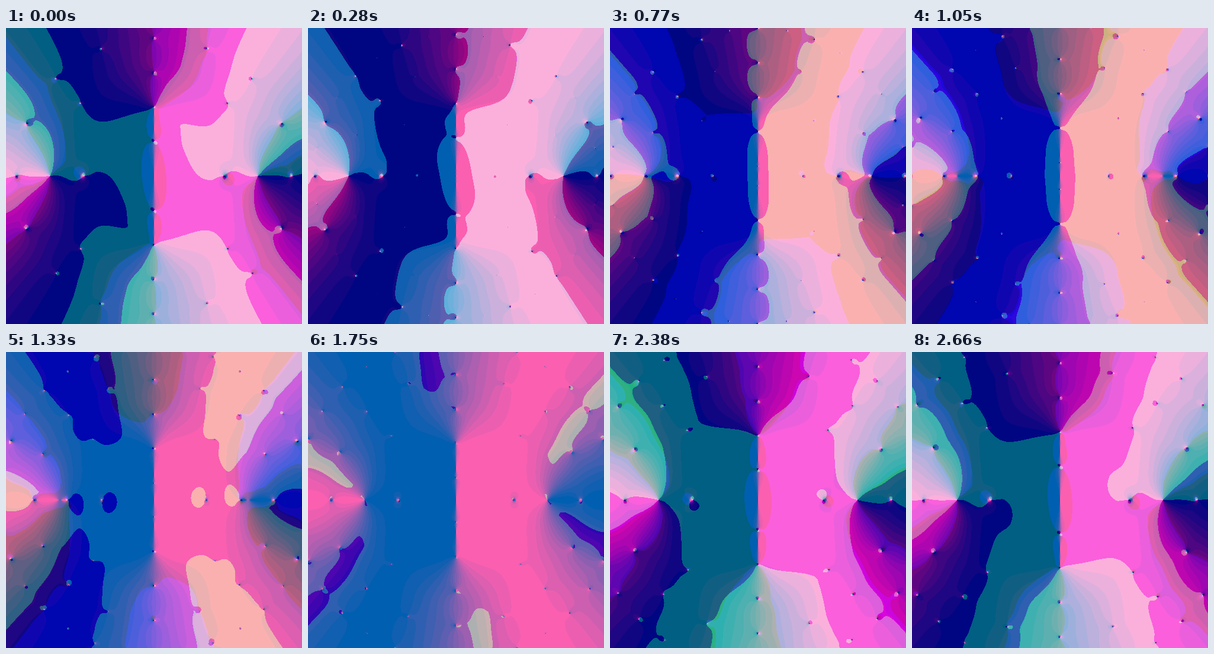
An HTML page with a canvas that plays this animation: 500x500 px, repeating every 2.73 s.

```html
<!DOCTYPE html>
<html>
<head>
<meta charset="utf-8">
<style>
  html, body { margin: 0; width: 100%; height: 100%; overflow: hidden; background: #005faf; }
  canvas { display: block; }
</style>
</head>
<body>
<canvas width="500" height="500"></canvas>
<script>
const SIZE = 500, HALF = 250, STEPS = 39, STEP_MS = 70;
const RING_GAP = 58.5, THRESHOLD = 0.55;
const GREENS = [6, 95, 176], BLUES = [130, 176, 220];
const ctx = document.querySelector('canvas').getContext('2d');
const cache = [];

const wave = (t, peak, mid, amp) => mid + amp * Math.cos(2 * Math.PI * (t - peak));
const smooth = (lo, hi, v) => {
  const k = Math.min(1, Math.max(0, (v - lo) / (hi - lo)));
  return k * k * (3 - 2 * k);
};
const level = v => v > THRESHOLD ? 2 : v < -THRESHOLD ? 0 : 1;

// Rings drift outwards; each ring doubles its points, the new ones growing with t.
function makePoles(t) {
  const poles = [];
  for (let n = 0; n < 5; n++) {
    const count = 2 ** (n + 1), r = RING_GAP * (n + t);
    for (let j = 0; j < count; j++) {
      const a = Math.PI / 2 + 2 * Math.PI * j / count;
      const strength = 2.5 + 4 * Math.cos(a) ** 8;
      const weight = strength * (n === 0 || j % 2 ? t : 1);
      const x = r * Math.cos(a), y = r * Math.sin(a);
      if (Math.max(Math.abs(x), Math.abs(y)) < HALF + 30) {
        poles.push({ x, y, c: weight * Math.cos(2 * a), s: weight * Math.sin(2 * a) });
      }
    }
  }
  return poles;
}

function field(x, y, t, poles) {
  const rho2 = wave(t, 0.15, 172, 14) ** 2, shift = wave(t, 0, 4, 10);
  const r = Math.hypot(x, y);
  const calm = smooth(80 + shift, 180 + shift, r);
  const hx = x - (x * x * x - 3 * x * y * y) / rho2;
  const hy = calm * (y - (3 * x * x * y - y * y * y) / rho2);
  const gain = (1 + 0.2 * smooth(100, 200, r)) / (Math.hypot(hx, hy) + 18);
  let vx = hx * gain, vy = hy * gain;
  for (const p of poles) {
    const dx = x - p.x, dy = y - p.y, d2 = dx * dx + dy * dy + 0.01;
    vx -= (p.c * dx - p.s * dy) / d2;
    vy -= (p.s * dx + p.c * dy) / d2;
  }
  return [vx, vy];
}

function render(t) {
  const image = ctx.createImageData(SIZE, SIZE), data = image.data;
  const poles = makePoles(t);
  // Green and blue follow the same two gains, mirrored in time.
  const gainX = time => wave(time, 0.245, 0.54, 0.4);
  const gainY = time => wave(time, -0.074, 0.5, 0.42);
  const mirrored = 0.206 - t;
  const gx = gainX(t), gy = gainY(t), bx = gainX(mirrored), by = gainY(mirrored);

  const plot = (px, py, red, x, y) => {
    const i = 4 * (py * SIZE + px);
    data[i] = Math.round((1 + red) * 8) * 15.7;
    data[i + 1] = GREENS[level(gx * x + gy * y)];
    data[i + 2] = BLUES[level(bx * x + by * y)];
    data[i + 3] = 255;
  };

  // The field mirrors in both axes, so one quadrant is enough.
  for (let j = 0; j < HALF; j++) {
    for (let i = 0; i < HALF; i++) {
      const [vx, vy] = field(i + 0.5, j + 0.5, t, poles);
      const length = Math.hypot(vx, vy) || 1, cap = Math.max(1, length / 1.2);
      const red = vx / length, x = vx / cap, y = vy / cap;
      const left = HALF - 1 - i, right = HALF + i;
      const top = HALF - 1 - j, bottom = HALF + j;
      plot(right, top, red, x, -y);
      plot(left, top, -red, -x, -y);
      plot(right, bottom, red, x, y);
      plot(left, bottom, -red, -x, y);
    }
  }
  return image;
}

let shown = -1;
function draw() {
  const step = Math.floor(performance.now() / STEP_MS) % STEPS;
  if (step !== shown) {
    cache[step] = cache[step] || render(step / STEPS);
    ctx.putImageData(cache[step], 0, 0);
    shown = step;
  }
  requestAnimationFrame(draw);
}
draw();
</script>
</body>
</html>
```
